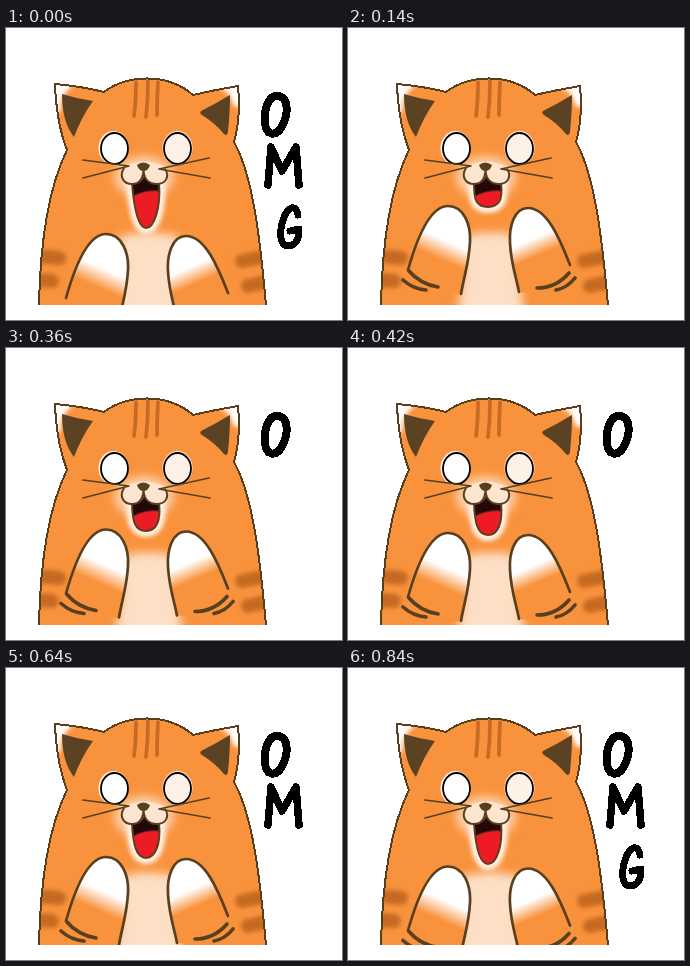
Animation of 336 by 292 pixels, one loop 980 ms. Source, as an HTML page:

```html
<!DOCTYPE html>
<html lang="en">
<head>
<meta charset="utf-8">
<title>Surprised cat</title>
<style>
  html, body { margin: 0; width: 100%; height: 100%; overflow: hidden; background: #fff; }
  svg { display: block; width: 336px; height: 292px; }
  .line { fill: none; stroke: #58401f; stroke-width: 2; stroke-linecap: round; stroke-linejoin: round; }
  .letter { fill: none; stroke: #000; stroke-width: 8; stroke-linecap: round; stroke-linejoin: round; }
  .letter, .outline { shape-rendering: crispEdges; }
  .stripe { fill: none; stroke: #c66a24; stroke-linecap: round; }
</style>
</head>
<body>
<svg viewBox="0 0 336 292">
  <defs>
    <filter id="soft" x="-50%" y="-50%" width="200%" height="200%"><feGaussianBlur stdDeviation="5"/></filter>
    <filter id="fuzzy" x="-50%" y="-50%" width="200%" height="200%"><feGaussianBlur stdDeviation="2"/></filter>
    <filter id="smooth" x="-20%" y="-20%" width="140%" height="140%"><feGaussianBlur stdDeviation="0.7"/></filter>
    <linearGradient id="leftPaw" gradientUnits="userSpaceOnUse" x1="99" y1="213" x2="91" y2="231">
      <stop offset="0" stop-color="#fff"/><stop offset="1" stop-color="#f9923c"/>
    </linearGradient>
    <linearGradient id="rightPaw" gradientUnits="userSpaceOnUse" x1="182" y1="212" x2="189" y2="228">
      <stop offset="0" stop-color="#fff"/><stop offset="1" stop-color="#f9923c"/>
    </linearGradient>
    <path id="body" d="M33 277C34 225 40 165 61 122C54 104 50 82 49 56Q74 58 98 64C122 46 162 45 187 67Q208 62 232 58Q235 90 228 114C247 148 254 210 260 277"/>
    <clipPath id="inside"><use href="#body"/></clipPath>
    <clipPath id="floor"><rect width="336" height="277"/></clipPath>
    <clipPath id="mouthClip"><path class="mouthShape"/></clipPath>
  </defs>

  <g clip-path="url(#floor)">
    <use href="#body" fill="#f9923c"/>
    <g clip-path="url(#inside)">
      <g fill="#fff" filter="url(#fuzzy)">
        <path d="M44 50L68 56L60 64L56 70L54 84L48 86Z"/>
        <path d="M238 52L214 60L223 66L228 78L238 80Z"/>
      </g>
      <g class="stripe" stroke-width="14" filter="url(#fuzzy)">
        <path d="M32 228L53 230M32 252L46 253M236 233L262 228M242 258L264 253"/>
      </g>
      <path d="M108 290Q120 240 112 209Q142 200 174 209Q166 240 178 290Z" fill="#fddfc6" filter="url(#soft)"/>
    </g>
    <g fill="#5b4223" filter="url(#smooth)">
      <path d="M56 66Q72 71 87 73Q76 88 68 109Q56 94 56 66Z"/>
      <path d="M224 67Q211 75 195 83Q193 85 196 87Q209 95 218 106Q221 109 222 104Q224 84 224 67Z"/>
    </g>
    <path class="stripe" stroke-width="3.7" filter="url(#smooth)" d="M130 54Q130 73 128 88M142 53Q142 72 140 89M152 54Q151 72 151 87"/>
    <use href="#body" class="line outline"/>

    <ellipse cx="138" cy="149" rx="30" ry="21" fill="#fcd0a8" filter="url(#soft)"/>
    <g fill="#fff3e8" filter="url(#smooth)">
      <ellipse cx="107.5" cy="120" rx="15" ry="17"/>
      <ellipse cx="171.5" cy="120" rx="15" ry="17"/>
    </g>
    <g stroke="#000" stroke-width="1.8">
      <ellipse cx="108.5" cy="120.5" rx="13.5" ry="15.5" fill="#fff"/>
      <ellipse cx="171.5" cy="120.5" rx="13.5" ry="15.5" fill="#fdf0e5"/>
    </g>

    <path class="mouthShape" fill="#fff0e2" stroke="#fff0e2" stroke-width="12" filter="url(#fuzzy)"/>
    <path class="mouthShape" fill="#240708"/>
    <path d="M122 171Q140 159 158 164V205H122Z" fill="#ed1c24" stroke="#58201a" clip-path="url(#mouthClip)"/>
    <path class="mouthShape line"/>
    <path d="M118 139C113 148 117 156 126 156C134 156 137 151 138 146C139 152 144 156 151 156C160 156 164 148 159 139Q138 128 118 139Z" fill="#fde5d2" filter="url(#smooth)"/>
    <path class="line" d="M118 140C113 148 117 156 126 156C134 156 137 151 137.500 142C138 152 144 156 151 156C160 156 164 148 159 141"/>
    <path d="M131 137Q137 132 144 137Q142 143 137.500 143Q133 143 131 137Z" fill="#58401f"/>
    <path class="line" style="stroke-width:1.7" d="M77 132L123 138L77 150M203 130L153 141L204 150"/>

    <g id="arms">
      <path fill="url(#leftPaw)" d="M60 242C69 210 82 178 100 178C116 178 123 197 122 214C121 235 116 248 113 266L78 266Z"/>
      <path fill="url(#rightPaw)" d="M222 237C212 211 199 180 180 180C166 180 161 199 162 215C163 236 168 248 171 264L205 266Z"/>
      <g class="line" style="stroke-width:2.7">
        <path d="M60 242C69 210 82 178 100 178C116 178 123 197 122 214C121 235 116 248 113 266"/>
        <path d="M222 237C212 211 199 180 180 180C166 180 161 199 162 215C163 236 168 248 171 264"/>
      </g>
      <path id="creases" class="line" style="stroke-width:3.6" filter="url(#smooth)" d="M61 243Q72 256 90 259M55 252Q65 261 78 262M189 260Q208 260 221 245M208 262Q219 260 227 250"/>
    </g>
  </g>

  <path class="letter" d="M272 68C261 67 258 84 259 95C260 107 269 109 275 100C283 87 283 69 272 68Z"/>
  <path class="letter" style="stroke-width:7.500" d="M262 157L265 119L276 143L290 119L293 157"/>
  <path class="letter" style="stroke-width:7" d="M292 187C290 175 281 179 277 192C273 205 274 218 282 218C289 218 293 212 293 201L284 203"/>
</svg>
<script>
  const STEP = 140;
  const armDrop = [28, 0, 3.5, 7, 11, 15, 20.5];
  const mouthBottom = [200, 179, 183, 187, 190, 193, 196];
  const lettersShown = [3, 0, 1, 1, 2, 2, 3];
  const CREASE_LIMIT = 25; // arms lower than this hide their creases

  const arms = document.getElementById('arms');
  const creases = document.getElementById('creases');
  const mouths = document.querySelectorAll('.mouthShape');
  const letters = document.querySelectorAll('.letter');

  function mouthPath(bottom) {
    const open = (bottom - 179) / 21;
    const mid = 172 + 8 * open;
    return `M126 155Q134 156 138 148Q144 156 153 155` +
      `C155 ${mid} ${151 - 3 * open} ${bottom} 140 ${bottom}` +
      `C${128 + 4 * open} ${bottom} ${126 + 2 * open} ${mid} 126 155Z`;
  }

  function show(element, visible) {
    element.style.visibility = visible ? 'visible' : 'hidden';
  }

  function draw(time) {
    const pose = Math.floor(time / STEP) % armDrop.length;
    const shape = mouthPath(mouthBottom[pose]);
    mouths.forEach(mouth => mouth.setAttribute('d', shape));
    arms.setAttribute('transform', `translate(0 ${armDrop[pose]})`);
    show(creases, armDrop[pose] < CREASE_LIMIT);
    letters.forEach((letter, i) => show(letter, i < lettersShown[pose]));
  }

  const start = performance.now();
  function tick() {
    draw(performance.now() - start);
    requestAnimationFrame(tick);
  }
  tick();
</script>
</body>
</html>
```
